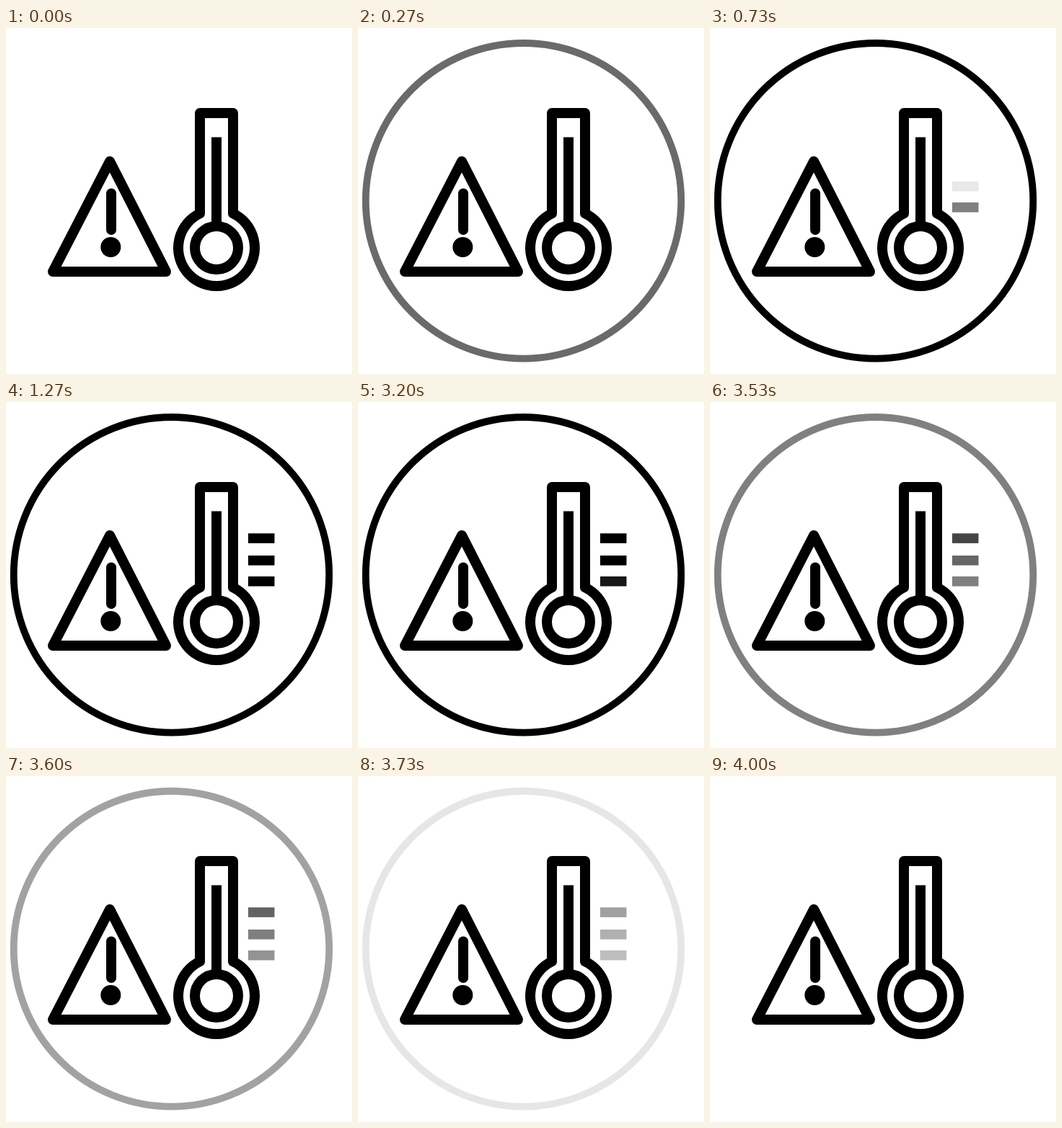
An HTML page for the animation above (4.07 s loop, 480x480 px).

```html
<!DOCTYPE html>
<html lang="en">
<head>
<meta charset="utf-8">
<title>Temperature warning</title>
<style>
  html, body { margin: 0; height: 100%; overflow: hidden; background: #fff; }
  svg { display: block; width: 100vw; height: 100vh; }
</style>
</head>
<body>
<svg viewBox="0 0 480 480">
  <circle class="fade" cx="229.5" cy="239.8" r="218.8" fill="none" stroke="#000" stroke-width="9.8"/>
  <g fill="none" stroke="#000" stroke-width="14" stroke-linejoin="round">
    <path d="M144 185L222 338H65Z"/>
    <path d="M146 229.5V280" stroke-linecap="round"/>
    <path d="M269 257.3V118H315V257.3A53 53 0 1 1 269 257.3Z"/>
    <circle cx="292" cy="305" r="30"/>
    <path d="M292 151.5V275"/>
  </g>
  <circle cx="145.3" cy="304" r="14"/>
  <rect class="fade" x="336" y="242" width="36.5" height="13.6"/>
  <rect class="fade" x="336" y="213" width="36.5" height="13.6"/>
  <rect class="fade" x="336" y="182.3" width="36.5" height="13.6"/>
</svg>
<script>
const LOOP = 4070, STEP = 1000 / 15;
// fade-in start, end, fade-out start, end (ms): ring, then bars bottom to top
const times = [
  [33, 433, 3283, 3783],
  [533, 933, 3128, 3945],
  [700, 1067, 3257, 3947],
  [867, 1267, 3383, 3942]
];
const parts = document.querySelectorAll(".fade");
const ramp = (t, a, b) => Math.min(1, Math.max(0, (t - a) / (b - a)));

function draw(now) {
  const t = Math.floor((now % LOOP + 6) / STEP) * STEP;
  parts.forEach((part, i) => {
    const [a, b, c, d] = times[i];
    part.style.opacity = ramp(t, a, b) - ramp(t, c, d);
  });
}

let start;
function tick(now) {
  start ??= now;
  draw(now - start);
  requestAnimationFrame(tick);
}
draw(0);
requestAnimationFrame(tick);
</script>
</body>
</html>
```
